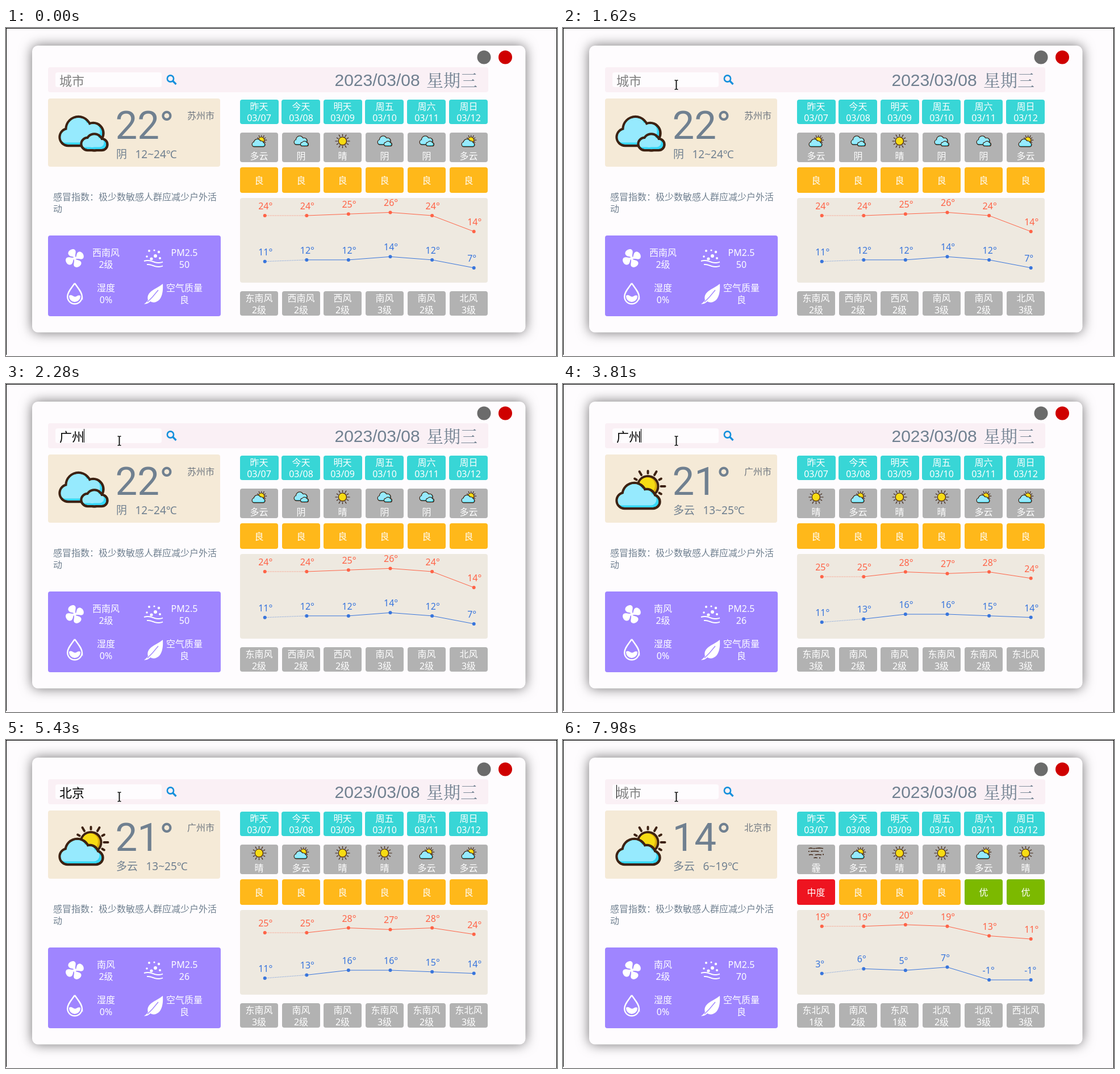
These frames come from a looping animation (970 px wide and 577 px high, 8 s). An HTML page with a canvas:

```html
<!DOCTYPE html>
<html lang="zh-CN">
<head>
<meta charset="utf-8">
<title>天气</title>
<style>
html, body { margin: 0; width: 100%; height: 100%; overflow: hidden; background: #fefcfe; }
canvas { display: block; }
</style>
</head>
<body>
<canvas id="stage" width="970" height="577"></canvas>
<script>
const ctx = document.getElementById('stage').getContext('2d');
const LOOP = 8000;
const UI = '"Noto Sans", "Noto Sans CJK SC", "Noto Sans CJK", sans-serif';
const CJK = '"Noto Sans CJK SC", "Noto Sans CJK", sans-serif';
const ARIAL = '"Liberation Sans", sans-serif';
const SONG = '300 30px "Noto Serif CJK SC", "Noto Sans CJK SC", serif';
const IME = 'Lato, "Noto Sans CJK SC", "Noto Sans CJK", sans-serif';
const SLATE = '#708090', GREY = '#b2b2b2', DARK = '#3d2212', PURPLE = '#9f85ff', PAPER = '#fefcfe';
const QUALITY = { '良': '#ffb81a', '中度': '#ee1420', '优': '#7cb900' };

const DAYS = ['昨天', '今天', '明天', '周五', '周六', '周日'];
const list = s => s.split(' ');
const CITIES = [
  { city: '苏州市', temp: '22°', sky: '阴', range: '12~24℃', wind: '西南风', pm: '50',
    skies: list('多云 阴 晴 阴 阴 多云'), air: list('良 良 良 良 良 良'),
    highs: [24, 24, 25, 26, 24, 14], highZero: 397.2,
    lows: [11, 12, 12, 14, 12, 7], lowZero: 441.5,
    winds: list('东南风 西南风 西风 南风 南风 北风'), force: list('2 2 2 3 2 3') },
  { city: '广州市', temp: '21°', sky: '多云', range: '13~25℃', wind: '南风', pm: '26',
    skies: list('晴 多云 晴 晴 多云 多云'), air: list('良 良 良 良 良 良'),
    highs: [25, 25, 28, 27, 28, 24], highZero: 409,
    lows: [11, 13, 16, 16, 15, 14], lowZero: 449.8,
    winds: list('东南风 南风 南风 东南风 东南风 东北风'), force: list('3 2 2 3 2 3') },
  { city: '北京市', temp: '14°', sky: '多云', range: '6~19℃', wind: '南风', pm: '70',
    skies: list('霾 多云 晴 晴 多云 晴'), air: list('中度 良 良 良 优 优'),
    highs: [19, 19, 20, 19, 13, 11], highZero: 380.9,
    lows: [3, 6, 5, 7, -1, -1], lowZero: 419.2,
    winds: list('东北风 南风 东风 北风 北风 西北风'), force: list('1 2 1 2 3 3') }
];

// Timeline: [start, value] entries, the latest one reached applies
const CITY_AT = [[0, 0], [2850, 1], [6030, 2]];
const INPUT_AT = [[0, ''], [2280, '广州'], [4650, ''], [5430, '北京'], [7980, '']];
const POPUP_AT = [
  [0, null],
  [1890, { x: 90, y: 79, w: 348, keys: 'gl', words: list('光 广 逛 犷 咣') }],
  [2070, { x: 90, y: 79, w: 478, keys: 'glv', words: list('光照 广州 光着 光柱 逛着') }],
  [2130, { x: 90, y: 79, w: 558, keys: 'glvz', words: list('广州 广州市 广州话 光州 广州站') }],
  [2280, null],
  [4980, { x: 133, y: 96, w: 348, keys: 'bw', words: list('被 备 呗 背 倍') }],
  [5100, { x: 133, y: 96, w: 478, keys: 'bwj', words: list('北京 背景 北极 悲剧 背脊') }],
  [5220, { x: 133, y: 96, w: 478, keys: 'bwjk', words: list('北京 背景 北境 悲境 倍镜') }],
  [5430, null]
];
const CARET_ON = [[1170, 1620], [2280, 2640], [2790, 3300], [3810, 4320], [4560, 5160], [5730, 6540], [7050, LOOP]];
const SELECTED = [[4560, 4650], [7440, 7980]];

const at = (track, t) => track.filter(e => e[0] <= t).pop()[1];
const within = (spans, t) => spans.some(([a, b]) => t >= a && t < b);

function box(x, y, w, h, r, fill) {
  ctx.fillStyle = fill;
  ctx.beginPath();
  ctx.roundRect(x, y, w, h, r);
  ctx.fill();
}

function disc(x, y, r, fill) {
  ctx.fillStyle = fill;
  ctx.beginPath();
  ctx.arc(x, y, r, 0, 7);
  ctx.fill();
}

function line(points, color, width) {
  ctx.strokeStyle = color;
  ctx.lineWidth = width;
  ctx.beginPath();
  points.forEach(([x, y]) => ctx.lineTo(x, y));
  ctx.stroke();
}

function text(s, x, y, font, color, align = 'left') {
  ctx.font = font;
  ctx.fillStyle = color;
  ctx.textAlign = align;
  ctx.fillText(s, x, y);
}

const label = (s, x, mid, color = '#fff', align = 'center') =>
  text(s, x, mid + 6, '16px ' + UI, color, align);

// Weather icons, drawn around 0,0 in a 90 unit box
function cloud(lobes, left, right, top, bottom) {
  const shape = (grow, dx, dy) => {
    const p = new Path2D();
    lobes.forEach(([x, y, r]) => {
      p.moveTo(x + dx + r + grow, y + dy);
      p.arc(x + dx, y + dy, r + grow, 0, Math.PI * 2);
    });
    p.rect(left + dx, top + dy, right - left, bottom - top + grow);
    return p;
  };
  ctx.fillStyle = DARK;
  ctx.fill(shape(4.2, 0, 0));
  ctx.save();
  ctx.clip(shape(0, 0, 0));
  ctx.fillStyle = '#35d7f8';
  ctx.fill(shape(0, 0, 0));
  ctx.fillStyle = '#96eafe';
  ctx.fill(shape(0, -4, -3.5));
  ctx.restore();
}

function sun(x, y, r, inner, outer) {
  for (let k = 0; k < 12; k++) {
    const a = k * Math.PI / 6, far = k % 2 ? outer - 3 : outer;
    line([[x + Math.cos(a) * inner, y + Math.sin(a) * inner],
          [x + Math.cos(a) * far, y + Math.sin(a) * far]], DARK, 4);
  }
  disc(x, y, r + 4, DARK);
  disc(x, y, r, '#dcb010');
  disc(x - 1.5, y - 1.5, r - 2, '#f6dc14');
}

const ICONS = {
  '阴'() {
    cloud([[-26, 6, 13], [-8, -8, 20], [18, -1, 16]], -26, 20, 0, 19);
    cloud([[8, 18, 9], [20, 15, 12.5], [33, 19, 8]], 8, 33, 14, 27);
  },
  '多云'() {
    sun(14, -6, 16, 23, 30);
    cloud([[-27, 19, 12], [-10, 9, 19], [12, 14, 13], [23, 21, 10]], -27, 23, 14, 31);
  },
  '晴'() { sun(0, 0, 22, 30, 42); },
  '霾'() {
    [[-42, -28, -20], [-4, -28, 40], [-30, -10, 14], [-40, 10, -20], [-4, 10, 30], [-12, 28, 6]]
      .forEach(([a, y, b]) => line([[a, y], [(a + b) / 2, y - 2], [b, y]], DARK, 4.5));
    [[34, -12], [-12, -27], [-42, -10], [22, 28], [42, 8]].forEach(([x, y]) => disc(x, y, 3.5, DARK));
  }
};

function icon(name, x, y, scale) {
  ctx.save();
  ctx.translate(x, y);
  ctx.scale(scale, scale);
  ctx.lineCap = 'round';
  ICONS[name]();
  ctx.restore();
}

function fan(x, y) {
  ctx.save();
  ctx.translate(x, y);
  ctx.rotate(-0.45);
  ctx.fillStyle = '#fff';
  for (let k = 0; k < 4; k++) {
    ctx.beginPath();
    ctx.moveTo(0, -1);
    ctx.bezierCurveTo(-1, -5, -8, -6, -7, -12);
    ctx.bezierCurveTo(-5, -18, 6, -18, 7, -12);
    ctx.bezierCurveTo(7, -8, 3, -6, 2, -1);
    ctx.fill();
    ctx.rotate(Math.PI / 2);
  }
  disc(0, 0, 2.6, '#fff');
  ctx.restore();
}

function dust() {
  [[252, 392, 2], [261, 391, 1.6], [269, 394, 2.2], [248, 402, 1.8], [263, 401, 3], [256, 406, 2.6], [271, 405, 2]]
    .forEach(([x, y, r]) => disc(x, y, r, '#fff'));
  [411, 418].forEach((y, k) => {
    const points = [];
    for (let x = 243 + k * 5; x <= 276; x++) points.push([x, y - 2 * Math.sin((x - 240) / 6)]);
    line(points, '#fff', 2);
  });
}

function drop() {
  ctx.strokeStyle = '#fff';
  ctx.lineWidth = 2.4;
  ctx.beginPath();
  ctx.moveTo(121, 449);
  ctx.bezierCurveTo(127, 458, 134, 465, 134, 473);
  ctx.arc(121, 472.5, 12.8, 0, Math.PI);
  ctx.bezierCurveTo(108, 465, 115, 458, 121, 449);
  ctx.stroke();
  ctx.fillStyle = '#fff';
  ctx.beginPath();
  ctx.moveTo(111, 471);
  ctx.bezierCurveTo(116, 467, 119, 475, 124, 472);
  ctx.quadraticCurveTo(128, 469, 131, 471);
  ctx.arc(121, 472, 10, 0, Math.PI);
  ctx.fill();
}

function leaf() {
  ctx.fillStyle = '#fff';
  ctx.beginPath();
  ctx.moveTo(276, 450);
  ctx.bezierCurveTo(277, 463, 275, 478, 264, 482);
  ctx.quadraticCurveTo(259, 484, 254, 481);
  ctx.quadraticCurveTo(249, 486, 243, 485.5);
  ctx.quadraticCurveTo(247, 483, 250, 479);
  ctx.bezierCurveTo(246, 463, 264, 460, 276, 450);
  ctx.fill();
  line([[249, 482], [258, 473], [268, 461]], PURPLE, 1.4);
}

function frameAndHeader() {
  ctx.fillStyle = PAPER;
  ctx.fillRect(0, 0, 970, 577);
  ctx.save();
  ctx.shadowColor = 'rgba(0,0,0,.55)';
  ctx.shadowBlur = 21;
  box(46, 31, 868.5, 504.5, 10, PAPER);
  ctx.restore();
  ctx.fillStyle = '#000';
  ctx.fillRect(0, 0, 970, 1);
  ctx.fillRect(0, 0, 1, 575);
  ctx.fillRect(969, 0, 1, 577);

  disc(841.5, 51.5, 12, '#6b6b6b');
  disc(879, 51.5, 12, '#cf0000');
  box(74, 69, 775, 44, 4, '#faf0f5');
  box(87, 78, 187, 26, 4, PAPER);
  ctx.strokeStyle = '#1490dc';
  ctx.lineWidth = 2.6;
  ctx.beginPath();
  ctx.arc(289.5, 89, 5.6, 0, 7);
  ctx.stroke();
  line([[293.5, 93], [299.5, 99]], '#1490dc', 3.2);
  text('2023/03/08', 578.5, 102, '30px ' + ARIAL, SLATE);
  text('星期三', 740, 102.5, SONG, SLATE);
}

function searchInput(t) {
  const value = at(INPUT_AT, t), font = '22px ' + CJK;
  const selected = within(SELECTED, t);
  if (selected) {
    ctx.fillStyle = '#0078d7';
    ctx.fillRect(94, 79, 43, 24);
  }
  text(value || '城市', 94, 100.5, font, selected ? '#fff' : value ? '#000' : '#7f7f7f');
  if (within(CARET_ON, t)) {
    ctx.fillStyle = '#000';
    ctx.fillRect(value ? 137 : 94, 79, 1, 24);
  }
}

function today(c) {
  box(74, 124, 303, 120, 4, '#f5ead7');
  icon(c.sky, 135.5, 186, 1);
  text(c.temp, 192.5, 195, '69px Roboto, sans-serif', SLATE);
  label(c.city, 367, 154, '#6f7780', 'right');
  text(c.sky, 194, 229, '19px ' + UI, SLATE);
  text(c.range, 208.5 + c.sky.length * 19, 229, '19px ' + UI, SLATE);
  label('感冒指数：极少数敏感人群应减少户外活', 83, 297, SLATE, 'left');
  label('动', 83, 318, SLATE, 'left');

  box(74, 365, 304, 142, 4, PURPLE);
  fan(121, 405);
  dust();
  drop();
  leaf();
  [[176, 395, c.wind, '2级'], [314, 395, 'PM2.5', c.pm], [176, 457, '湿度', '0%'], [314, 457, '空气质量', '良']]
    .forEach(([x, y, a, b]) => {
      label(a, x, y);
      label(b, x, y + 21);
    });
}

function series(values, zero, color) {
  const points = values.map((v, i) => [455.7 + i * 73.6, zero - v * 2.8]);
  ctx.setLineDash([1, 2]);
  line(points.slice(0, 2), color, 1);
  ctx.setLineDash([]);
  line(points.slice(1), color, 1);
  points.forEach(([x, y], i) => {
    disc(x, y, 3, color);
    label(values[i] + '°', x - 11.5, y - 17, color, 'left');
  });
}

function forecast(c) {
  DAYS.forEach((day, i) => {
    const x = Math.round(412 + i * 73.7), mid = x + 33.5, w = 67;
    box(Math.round(411.6 + i * 73.6), 126, w + 1, 43, 4, '#38d6d6');
    label(day, mid, 138);
    label('03/' + String(7 + i).padStart(2, '0'), mid, 158);
    box(x, 184, w, 52, 4, GREY);
    icon(c.skies[i], mid, 199, 0.3);
    label(c.skies[i], mid, 225);
    box(x, 245, w, 45, 4, QUALITY[c.air[i]]);
    label(c.air[i], mid, 268);
    box(x, 463, w, 43, 4, GREY);
    label(c.winds[i], mid, 475);
    label(c.force[i] + '级', mid, 495.5);
  });
  box(412, 299, 436, 149, 4, '#eee9e0');
  series(c.highs, c.highZero, '#ff6347');
  series(c.lows, c.lowZero, '#3875dc');
}

function popup({ x, y, w, keys, words }) {
  ctx.fillStyle = '#2d2d2d';
  ctx.fillRect(x, y, w, 92);
  ctx.fillStyle = '#fff';
  ctx.fillRect(x + 1, y + 46, w - 2, 45);
  text(keys, x + 14, y + 33, '26px ' + IME, '#fff');
  ctx.fillStyle = '#999';
  ctx.fillRect(Math.round(x + 15 + ctx.measureText(keys).width), y + 12, 1, 26);
  let left = x + 9;
  words.forEach((word, i) => {
    const s = i + 1 + '.' + word;
    text(s, left, y + 77, '24px ' + IME, i ? '#111' : '#777');
    left += ctx.measureText(s).width + 15;
  });
  const ax = x + w, ay = y + 76;
  line([[ax - 28, ay - 5], [ax - 33, ay], [ax - 28, ay + 5]], '#bbb', 2);
  line([[ax - 15, ay - 5], [ax - 10, ay], [ax - 15, ay + 5]], '#222', 2.4);
}

function beam(x, y) {
  const strokes = [[[-3, -8], [-1, -8], [0, -7], [0, 7], [-1, 8], [-3, 8]],
                   [[3, -8], [1, -8], [0, -7], [0, 7], [1, 8], [3, 8]]];
  for (const [color, width] of [['#fff', 3.6], ['#111', 1.5]])
    strokes.forEach(s => line(s.map(([a, b]) => [x + 0.5 + a, y + b]), color, width));
}

function arrow(x, y) {
  ctx.beginPath();
  [[0, 0], [0, 16.5], [4, 13], [6.5, 18.5], [9, 17.5], [6.6, 12], [11.5, 12]]
    .forEach(([a, b]) => ctx.lineTo(x + a, y + b));
  ctx.closePath();
  ctx.fillStyle = '#fff';
  ctx.fill();
  ctx.strokeStyle = '#000';
  ctx.lineWidth = 1;
  ctx.stroke();
}

function pointer(t) {
  if (t < 150) return;
  const step = Math.min(1, Math.floor((t - 150) / 30) / 20);
  const u = step * step * (3 - 2 * step), v = 1 - u;
  const bezier = (a, b, c, d) => v * v * v * a + 3 * v * v * u * b + 3 * v * u * u * c + u * u * u * d;
  const x = bezier(951, 800, 330, 199), y = bezier(66, 120, 175, 100);
  const overInput = x > 87 && x < 274 && y > 78 && y < 104;
  (overInput ? beam : arrow)(x, y);
}

function draw(t) {
  const city = CITIES[at(CITY_AT, t)], ime = at(POPUP_AT, t);
  frameAndHeader();
  searchInput(t);
  today(city);
  forecast(city);
  if (ime) popup(ime);
  pointer(t);
}

let start;
function tick(now) {
  start ??= now;
  draw((now - start) % LOOP);
  requestAnimationFrame(tick);
}
draw(0);
requestAnimationFrame(tick);
</script>
</body>
</html>
```
